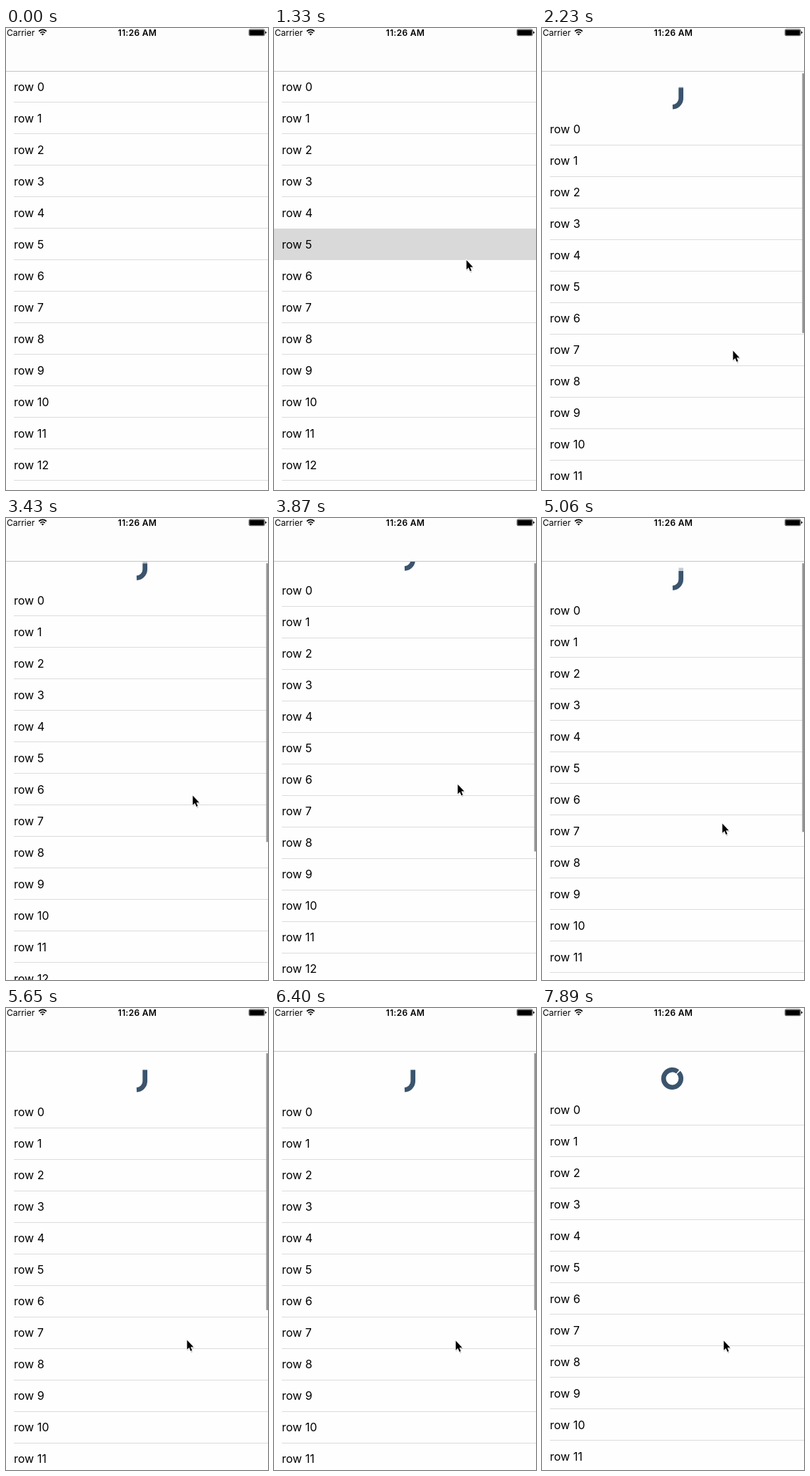
Recreate the animation shown at these times as an HTML page. Size 367x645 px, loop 8 s.

```html
<!DOCTYPE html>
<html lang="en">
<head>
<meta charset="utf-8">
<title>Pull to refresh</title>
<style>
  html, body { margin: 0; width: 100%; height: 100%; overflow: hidden; background: #fefefe; }
  svg { display: block; width: 100%; height: 100%; }
  text { font-family: Inter, Roboto, sans-serif; fill: #000; }
  .row { font-size: 16px; }
  .status { font-size: 12px; }
  .spin { fill: none; stroke-width: 6.6; }
</style>
</head>
<body>
<svg viewBox="0 0 367 645">
  <rect width="367" height="645" fill="#fefefe"/>
  <rect id="press" y="280" width="367" height="44" fill="#d9d9d9"/>
  <g id="rows"></g>
  <g id="icon">
    <path id="track" class="spin" stroke="#c3ccd4"/>
    <path id="stroke" class="spin" stroke="#3b546d"/>
  </g>
  <rect id="bar" x="364.5" y="63" width="2.5" rx="1.2" fill="#959595"/>

  <rect width="367" height="60" fill="#fdfdfd"/>
  <rect y="60" width="367" height="1" fill="#c6c6c6"/>
  <text class="status" x="1" y="10.5">Carrier</text>
  <g fill="none" stroke="#000" stroke-width="1.7">
    <path d="M46 4.6A7.6 7.6 0 0 1 56.6 4.6"/>
    <path d="M48 7A4.7 4.7 0 0 1 54.6 7"/>
  </g>
  <path d="M51.3 10.6L49.5 8.6A2.6 2.6 0 0 1 53.1 8.6Z"/>
  <text class="status" x="184" y="10.5" text-anchor="middle" font-weight="600" letter-spacing=".3">11:26 AM</text>
  <rect x="340.4" y="1.9" width="21.8" height="8.8" rx="1.6" fill="#fff" stroke="#000" stroke-width=".7"/>
  <rect x="341.2" y="2.7" width="20.2" height="7.2" rx=".8"/>
  <path d="M363.2 4.6Q364.8 5 364.8 6.3T363.2 8Z"/>

  <g id="cursor">
    <path d="M0 0V14.5L3.3 11.5 5.6 16.8 8 15.8 5.7 10.6H10.3Z" transform="translate(.6 1.4)" fill="#000" opacity=".2"/>
    <path d="M.6 .6V13.8L3.6 11 5.7 16 7.7 15.1 5.6 10.2H9.7Z" stroke="#fff" stroke-width="1.6" paint-order="stroke"/>
  </g>
</svg>
<script>
const LOOP = 8000, START = 600, STEP = 148.7;
const RELEASE = 39, SPIN_AT = 6947, RADIUS = 12.2;
const $ = id => document.getElementById(id);

// step, pull distance, pointer x, pointer y
const keys = [
  [0, 0, 362, 420], [4, 0, 269, 322], [6, 0, 269, 325], [7, 8, 269, 343],
  [9, 36, 268, 399], [11, 59.5, 267, 450], [13, 63, 267, 458], [14, 63, 267, 458],
  [19, 33, 261, 387], [24, 11, 254, 361], [26, 6, 252, 354], [30, 47, 252, 426],
  [34, 63.5, 253, 463], [RELEASE, 63.5, 254, 464], [41, 60, 254, 464], [60, 60, 254, 464]
];

$('rows').innerHTML = Array.from({ length: 13 }, (_, i) =>
  `<text class="row" x="11" y="${87.6 + i * 44}">row ${i}</text>` +
  `<rect class="line" x="11" width="356" height="1" fill="#dcdcdc"/>`).join('');
const texts = [...document.querySelectorAll('.row')];
const lines = [...document.querySelectorAll('.line')];

const clamp = v => Math.max(0, Math.min(1, v));
const mix = (a, b, p) => a + (b - a) * p;

function pose(k) {
  const n = Math.max(1, keys.findIndex(key => key[0] > k));
  const a = keys[n - 1], b = keys[n];
  const p = clamp((k - a[0]) / (b[0] - a[0]));
  return a.map((v, i) => mix(v, b[i], p)).slice(1);
}

// Straight stem on the right that runs clockwise into the ring.
function hook(top, angle) {
  const at = a => `${RADIUS * Math.cos(a)} ${RADIUS * Math.sin(a)}`;
  return `M${RADIUS} ${-top}V0A${RADIUS} ${RADIUS} 0 0 1 ${at(angle / 2)}` +
    `A${RADIUS} ${RADIUS} 0 0 1 ${at(angle)}`;
}

function draw(ms) {
  const k = Math.floor((ms - START + 14) / STEP);
  const t = START + k * STEP;
  const [pull, x, y] = pose(k);

  texts.forEach((el, i) => el.setAttribute('y', 87.6 + i * 44 + pull));
  lines.forEach((el, i) => {
    el.setAttribute('y', 103 + i * 44 + Math.round(pull));
    el.style.opacity = k === 5 && (i === 4 || i === 5) ? 0 : 1;
  });
  $('press').style.opacity = k === 5 ? 1 : 0;

  const p = clamp((k - RELEASE) / 3.5);
  const ease = p * p * (3 - 2 * p);
  const spin = Math.max(0, t - SPIN_AT) * 0.72;
  $('icon').setAttribute('transform', `translate(182.5 ${38.5 + pull}) rotate(${spin})`);
  $('icon').style.opacity = k > 6 ? 1 : 0;
  $('track').setAttribute('d', `M${RADIUS} -16V0`);
  $('track').style.opacity = p > 0 ? 0 : 1;
  $('stroke').setAttribute('d', hook(pull / 4.1 * (1 - ease), mix(1.53, 6.15, ease)));

  $('bar').setAttribute('height', 422.5 - pull);
  $('bar').style.opacity = k < 7 ? 0 : clamp((42.5 - k) / 2);

  $('cursor').setAttribute('transform', `translate(${x} ${y})`);
  $('cursor').style.opacity = k < 0 ? 0 : 1;
}

const begin = performance.now();
function tick() {
  draw((performance.now() - begin) % LOOP);
  requestAnimationFrame(tick);
}
tick();
</script>
</body>
</html>
```
